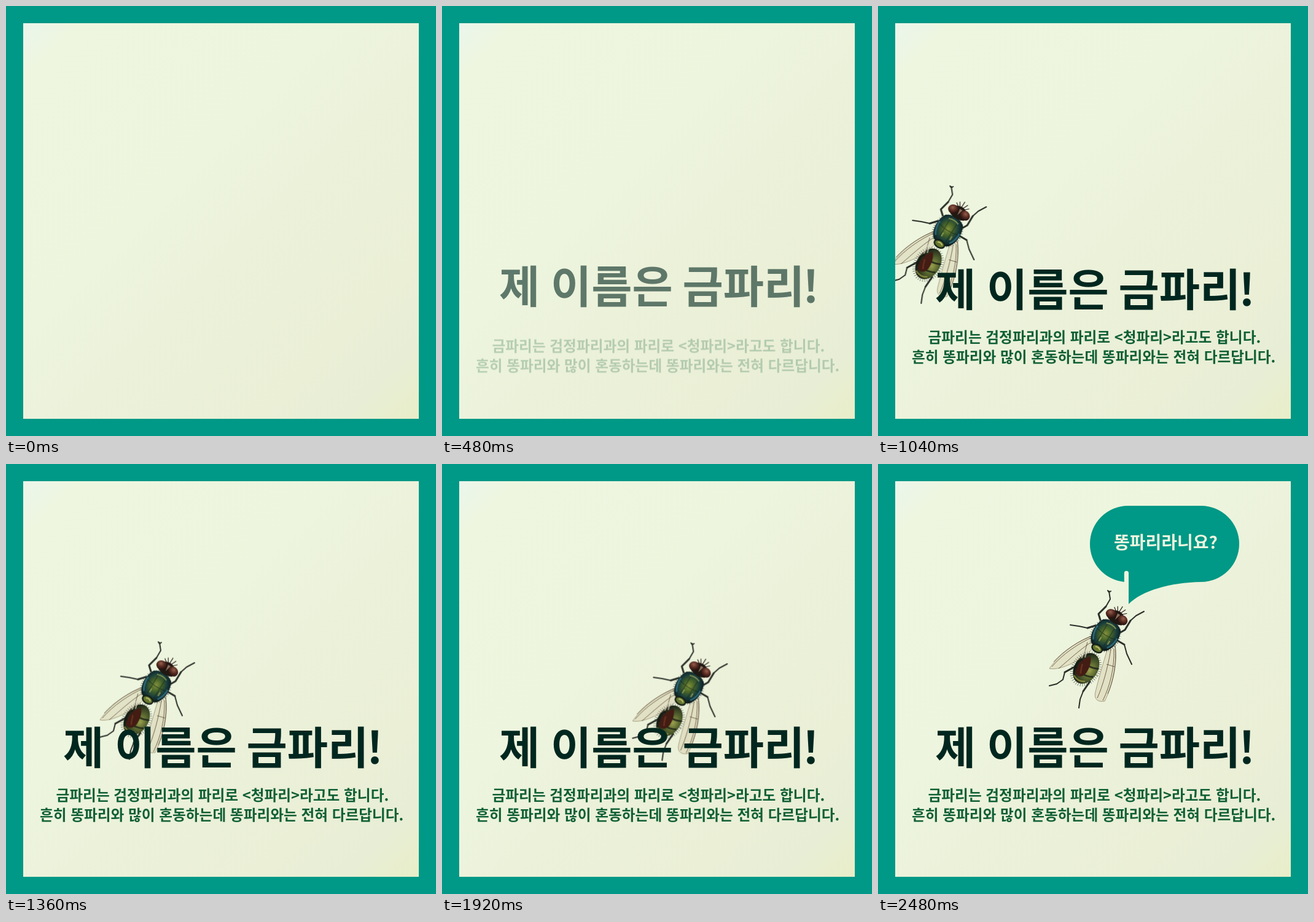
Write an HTML page that moves like this. It is 700 px wide and 700 px high and loops after 4900 ms.

```html
<!DOCTYPE html>
<html lang="ko">
<head>
<meta charset="utf-8">
<title>금파리</title>
<style>
html, body { margin: 0; width: 100%; height: 100%; overflow: hidden; background: #009886; }
svg { display: block; width: 100vw; height: 100vh; }
text { font-family: "Noto Sans CJK KR", "Noto Sans CJK", sans-serif; font-weight: 700; white-space: pre; }

/* one step every 80 ms, on a 4900 ms loop */
.title, .note, .fly, .bubble { animation: 4900ms linear infinite; }
.title { font-size: 72px; fill: #00271f; animation-name: drop, show-title; }
.note { font-size: 23.7px; fill: #0f5f35; animation-name: rise, show-note; }
.fly { animation-name: flight; }
.bubble { animation-name: pop; }
.bubble text { font-size: 28px; fill: #eef5df; }

@keyframes drop {
  0% { transform: translateY(-20px); animation-timing-function: steps(8); }
  13.06%, 100% { transform: none; }
}
@keyframes show-title {
  0% { opacity: 0; animation-timing-function: steps(10); }
  16.32%, 100% { opacity: 1; }
}
@keyframes rise {
  0%, 6.53% { transform: translateY(20px); animation-timing-function: steps(7); }
  17.95%, 100% { transform: none; }
}
@keyframes show-note {
  0%, 6.53% { opacity: 0; animation-timing-function: steps(8); }
  19.59%, 100% { opacity: 1; }
}
@keyframes flight {
  0%, 11.42% { transform: translate(-417px, 267px); animation-timing-function: steps(7); }
  22.85% { transform: translate(-230px, 57px); animation-timing-function: steps(8); }
  35.91% { transform: translate(47px, 128px); animation-timing-function: steps(6); }
  45.71%, 100% { transform: translate(0, 0); }
}
@keyframes pop {
  0%, 40.81% { transform: translateY(-20px); opacity: 0; animation-timing-function: steps(6); }
  50.61%, 100% { transform: none; opacity: 1; }
}

.legs { fill: none; stroke: #2b302a; stroke-linejoin: round; stroke-linecap: round; }
.wing { fill: #b9a676; fill-opacity: .22; stroke: #7d6a4a; stroke-width: .6; }
.vein { fill: none; stroke: #4d3a26; stroke-width: 1; opacity: .75; }
.hair { fill: none; stroke: #1d2620; stroke-width: 7; stroke-dasharray: .8 2.6; opacity: .6; }
</style>
</head>
<body>
<svg viewBox="0 0 700 700">
  <defs>
    <linearGradient id="paper" x1="0" y1="0" x2="1" y2="1">
      <stop offset="0" stop-color="#ebf6ec"/>
      <stop offset=".07" stop-color="#eef6e0"/>
      <stop offset=".4" stop-color="#edf5de"/>
      <stop offset=".55" stop-color="#ecf1da"/>
      <stop offset=".8" stop-color="#eaefd6"/>
      <stop offset=".9" stop-color="#e8eed6"/>
      <stop offset=".95" stop-color="#e8eecf"/>
      <stop offset="1" stop-color="#e9edc8"/>
    </linearGradient>
    <radialGradient id="thorax" cx=".48" cy=".46" r=".56">
      <stop offset="0" stop-color="#83923c"/>
      <stop offset=".35" stop-color="#486529"/>
      <stop offset=".7" stop-color="#183c3c"/>
      <stop offset="1" stop-color="#0c1719"/>
    </radialGradient>
    <radialGradient id="belly" cx=".68" cy=".5" r=".6">
      <stop offset="0" stop-color="#9aa04c"/>
      <stop offset=".45" stop-color="#55642f"/>
      <stop offset="1" stop-color="#161d15"/>
    </radialGradient>
    <radialGradient id="eye" cx=".42" cy=".35" r=".65">
      <stop offset="0" stop-color="#94614f"/>
      <stop offset=".5" stop-color="#5c2d23"/>
      <stop offset="1" stop-color="#25110e"/>
    </radialGradient>
  </defs>

  <rect x="28" y="28" width="644" height="644" fill="url(#paper)"/>

  <g class="fly">
    <g class="legs">
      <path stroke-width="3" d="M362 254L359 244L371 232M395 274L402 270L411 255M354 263L341 267M389 287L401 294M324 328L304 339M345 354L334 370"/>
      <path stroke-width="2" d="M371 232L378 220L376 207M374 206L376 209L379 207M411 255L420 247L433 240M341 267L327 264L313 262M401 294L405 309L413 326M304 339L301 351L291 358L279 361M334 370L329 383L327 397"/>
    </g>

    <g transform="translate(370 279) rotate(32)">
      <ellipse class="hair" cx="2" cy="63" rx="20" ry="27"/>
      <ellipse cx="2" cy="62" rx="19" ry="27" fill="url(#belly)"/>
      <path d="M-14 53Q2 61 20 52M-16 68Q2 78 19 68" fill="none" stroke="#141a15" stroke-width="2.8" opacity=".75"/>
      <path d="M-9 82Q2 88 12 81" fill="none" stroke="#a19c44" stroke-width="2.5" opacity=".7"/>
    </g>

    <path class="wing" d="M352 278C328 286 296 308 279 333C294 336 317 325 331 316C342 308 352 300 358 290Z"/>
    <path class="vein" d="M351 281C326 292 300 310 283 330M352 287C332 299 314 316 294 333M341 290L334 315M352 279C329 286 302 304 286 322"/>
    <path class="wing" d="M386 295C391 322 382 361 369 386C358 388 351 383 354 371C360 346 367 323 373 303Z"/>
    <path class="vein" d="M384 301C385 331 378 361 366 385M379 302C374 332 366 361 357 381M372 326L385 330M386 296C389 327 382 355 374 374"/>

    <g transform="translate(370 279) rotate(32)">
      <path d="M-2 42C-11 49-14 65-9 77C-1 83 6 76 6 66C6 56 3 48-2 42Z" fill="#431c13"/>
      <path d="M-7 59Q-4 69-1 74" fill="none" stroke="#7c402a" stroke-width="2.6" opacity=".6"/>
      <path d="M-13 34L-9 48M-16 37L-13 52" stroke="#d6d7c1" stroke-width="2" opacity=".7"/>

      <ellipse class="hair" rx="21" ry="25"/>
      <path d="M-17-20C-8-28 8-28 17-20C24-7 23 10 15 20C9 27-9 27-15 20C-23 10-24-7-17-20Z" fill="url(#thorax)"/>
      <path d="M-19-7Q-20 6-13 16M19-6Q20 7 13 16" fill="none" stroke="#357c90" stroke-width="2.8" opacity=".7"/>
      <path d="M-18-3Q0 2 18-3M-7-23L-6 17M7-23L7 17" fill="none" stroke="#12271f" stroke-width="1.5" opacity=".5"/>
      <path d="M-9-18Q0-22 9-18M-4 6V13M11 4V11" fill="none" stroke="#b0b765" stroke-width="2.3" opacity=".6"/>
      <ellipse cy="25" rx="9" ry="6" fill="#66762f" stroke="#141f17" stroke-width="2.4"/>
      <path d="M-4 24Q1 21 5 25" fill="none" stroke="#c0c373" stroke-width="2"/>

      <path d="M-14-28Q0-20 14-28L10-42Q0-49-10-42Z" fill="#201813"/>
      <path d="M-3-43L-8-51M-1-44V-55M2-44L6-53M4-42L11-49M-5-42L-12-47" stroke="#2a211b" stroke-width="1.2"/>
      <ellipse cx="-11" cy="-35" rx="8.5" ry="7.5" fill="url(#eye)" transform="rotate(-18 -11 -35)"/>
      <ellipse cx="11" cy="-36" rx="8.5" ry="7.5" fill="url(#eye)" transform="rotate(18 11 -36)"/>
      <path d="M-2-41L0-30L3-41Z" fill="#8f705c"/>
    </g>
  </g>

  <text class="title" y="488"><tspan x="93">제</tspan><tspan x="177">이름은</tspan><tspan x="391.5">금파리</tspan><tspan x="587">!</tspan></text>

  <g class="note">
    <text x="81.5" y="548">금파리는 검정파리과의 파리로 &lt;청파리&gt;라고도 합니다.</text>
    <text x="55" y="580">흔히 똥파리와 많이 혼동하는데 똥파리와는 전혀 다르답니다.</text>
  </g>

  <g class="bubble">
    <path fill="#009886" d="M407 68H526A62 62 0 0 1 526 192C475 193 430 206 408 228V177.5A3.6 3.6 0 0 0 400.8 177.5V192A62 62 0 0 1 345 130A62 62 0 0 1 407 68Z"/>
    <text x="384" y="138">똥파리라니요?</text>
  </g>

  <rect x="14" y="14" width="672" height="672" fill="none" stroke="#009886" stroke-width="28"/>
</svg>
</body>
</html>
```
